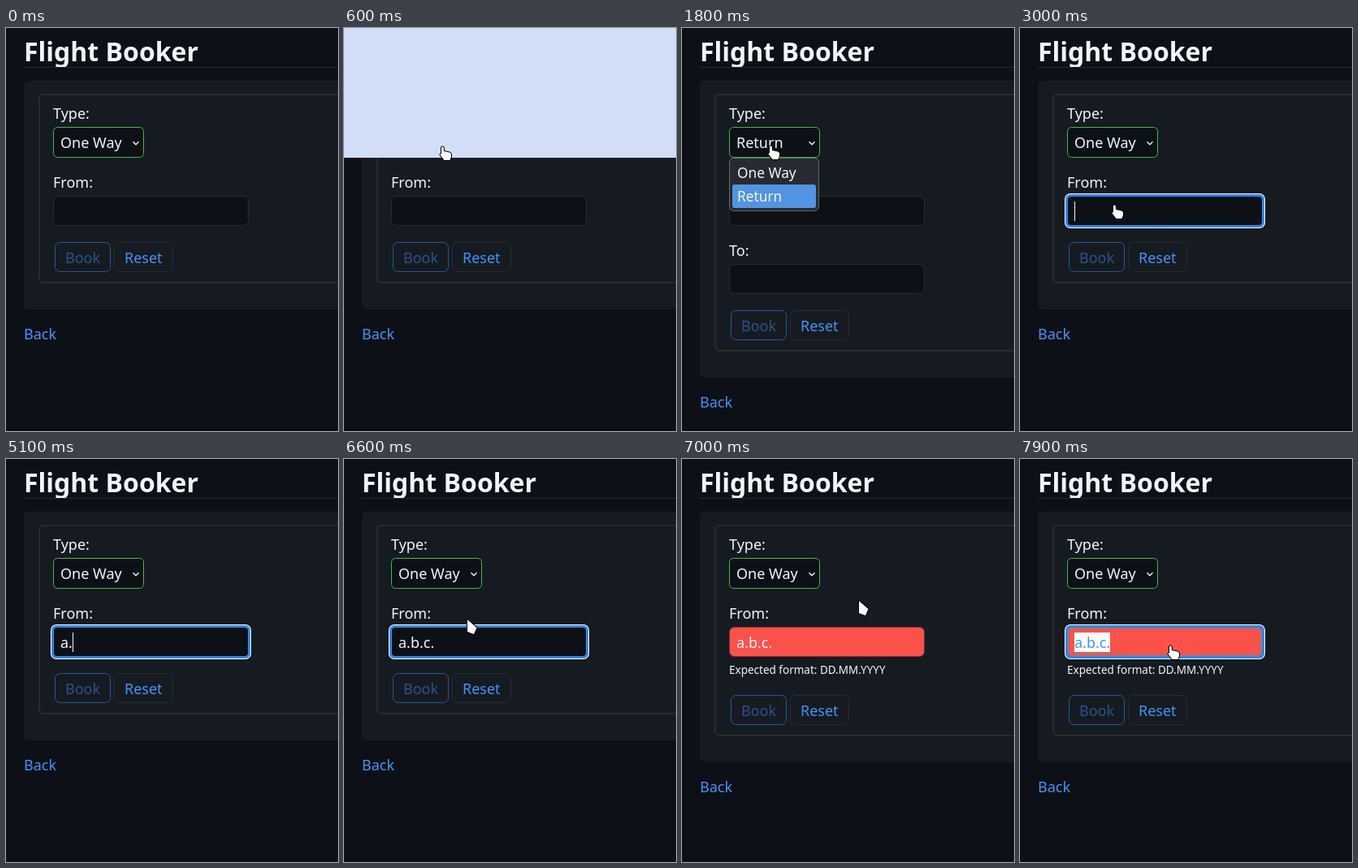
An HTML page with a canvas that plays this animation: 409x497 px, repeating every 8 s.

```html
<!DOCTYPE html>
<html lang="en">
<head>
<meta charset="utf-8">
<title>Flight Booker</title>
<style>
  html, body { margin: 0; width: 100%; height: 100%; overflow: hidden; background: #0d1117; }
  canvas { display: block; }
</style>
</head>
<body>
<canvas id="stage" width="409" height="497"></canvas>
<script>
const ctx = document.getElementById('stage').getContext('2d');
const LOOP = 8000, TICK = 100;
const FONT = '"Noto Sans", sans-serif';
const C = {
  page: '#0d1117', panel: '#161b22', line: '#262b32', text: '#f0f6fc', link: '#4493f8',
  green: '#3fb950', dim: '#2b5289', dimLine: '#28569b', red: '#fa524b', blue: '#3584e4',
  popup: '#282a31', popupLine: '#66686d', hover: '#5294e2', sheet: '#d2ddf8'
};

// time, x, y of the pointer's top left corner
const pointerPath = [
  [200, 230, -12], [500, 117, 146], [700, 118, 146], [1000, 112, 202], [1200, 112, 202],
  [1500, 107, 136], [1700, 106, 145], [1800, 106, 145], [2000, 108, 176], [2200, 108, 176],
  [2700, 112, 220], [2800, 112, 220], [3000, 113, 218], [6500, 113, 218],
  [6800, 229, 157], [6900, 229, 157], [7300, 183, 227], [7500, 182, 230], [8000, 182, 230]
];
const typing = [[3800, 'a'], [5100, 'a.'], [5300, 'a.b'], [5600, 'a.b.'], [5700, 'a.b.c'], [5900, 'a.b.c.']];

const handShape = new Path2D('M2 9V2Q2 .6 3.4 .6T4.9 2V6L12 7.6Q14 8.2 14 10V13L12.4 17H5.6L.8 11Q0 9 2 9Z');
const arrowShape = new Path2D('M0 0V15L8 18L11.5 10Z');
const chevron = new Path2D('M156.5 140.3L160 143.8L163.5 140.3');

const within = (t, a, b) => t >= a && t < b;

function box(x, y, w, h, r, fill, stroke, weight = 1) {
  const inset = stroke ? weight / 2 : 0;
  ctx.beginPath();
  ctx.roundRect(x + inset, y + inset, w - 2 * inset, h - 2 * inset, r);
  if (fill) { ctx.fillStyle = fill; ctx.fill(); }
  if (stroke) { ctx.strokeStyle = stroke; ctx.lineWidth = weight; ctx.stroke(); }
}

function label(str, x, y, color = C.text, size = 18, weight = 400) {
  ctx.font = `${weight} ${size}px ${FONT}`;
  ctx.fillStyle = color;
  ctx.fillText(str, x, y);
}

function pointerAt(t) {
  const i = pointerPath.findIndex(k => k[0] > t);
  const [t0, x0, y0] = pointerPath[i - 1], [t1, x1, y1] = pointerPath[i];
  const p = (t - t0) / (t1 - t0);
  return [Math.round(x0 + (x1 - x0) * p), Math.round(y0 + (y1 - y0) * p)];
}

function drawPointer(t, popup) {
  if (t < 200 || within(t, 3800, 6500)) return;
  const [x, y] = pointerAt(t);
  const onSelect = within(x, 58, 170) && within(y, 122, 160);
  const onInput = !popup && within(x, 58, 299) && within(y, 207, 244);
  const shape = onSelect || onInput ? handShape : arrowShape;
  ctx.save();
  ctx.translate(x, y);
  ctx.lineJoin = 'round';
  ctx.strokeStyle = '#000';
  ctx.lineWidth = 2;
  ctx.stroke(shape);
  ctx.fillStyle = '#fff';
  ctx.fill(shape);
  ctx.restore();
}

function drawInput(y, { focus, error, value = '', caret, selected } = {}) {
  const fill = error ? C.red : C.page;
  if (focus) {
    box(55, y - 3, 247, 43, 7, '#fff');
    box(56, y - 2, 245, 41, 6, C.blue);
    box(59, y + 1, 239, 35, 4, fill, error ? '#4a9a9c' : null);
  } else {
    box(58, y, 241, 37, 6, fill, error ? '#7d3435' : C.line);
  }
  ctx.font = `400 18px ${FONT}`;
  const w = ctx.measureText(value).width;
  if (selected) { ctx.fillStyle = '#fff'; ctx.fillRect(67, y + 7, Math.round(w), 24); }
  label(value, 67, y + 26, selected ? C.link : C.text);
  if (caret) { ctx.fillStyle = C.text; ctx.fillRect(Math.round(67 + w), y + 7, 1, 24); }
}

function drawPopup(active) {
  box(58, 160, 111, 66, 5, C.popup, C.popupLine);
  box(62, 193 - (active ? 0 : 29), 103, 29, 3, C.hover);
  label('One Way', 68, 185, C.text, 17.3);
  label('Return', 68, 214, C.text, 17.3);
}

function draw(t) {
  const isReturn = within(t, 1200, 2200);
  const popup = within(t, 700, 1200) || within(t, 1800, 2200);
  const error = t >= 6700;
  const focus = within(t, 2700, 6700) || t >= 7300;
  const selected = t >= 7900;
  const caret = focus && !within(t, 6300, 6700) && !selected;
  const value = typing.reduce((v, [at, str]) => t >= at ? str : v, '');
  const shift = isReturn ? 84 : error ? 27 : 0;

  ctx.fillStyle = C.page;
  ctx.fillRect(0, 0, 409, 497);
  label('Flight Booker', 22, 41, C.text, 32, 700);
  ctx.fillStyle = C.line;
  ctx.fillRect(22, 48, 387, 1);

  box(22, 65, 420, 282 + shift, 6, C.panel);
  box(40, 81, 420, 234 + shift, 5, null, C.line, 2);
  label('Type:', 58, 112);
  box(58, 122, 112, 38, 5, C.page, C.green);
  label(isReturn ? 'Return' : 'One Way', 67, 148);
  ctx.strokeStyle = C.text;
  ctx.lineWidth = 1.4;
  ctx.stroke(chevron);

  label('From:', 58, 197);
  drawInput(207, { focus, error, value, caret, selected });
  if (isReturn) {
    label('To:', 58, 281);
    drawInput(291);
  }
  if (error) label('Expected format: DD.MM.YYYY', 58, 265, C.text, 13.5);

  box(60, 264 + shift, 69, 37, 6, null, C.dimLine);
  label('Book', 73, 290 + shift, C.dim);
  box(133, 264 + shift, 73, 37, 6, null, C.line);
  label('Reset', 146, 290 + shift, C.link);
  label('Back', 22, 384 + shift, C.link);

  if (popup) drawPopup(within(t, 900, 1900));
  if (within(t, 3900, 5100)) box(58, 247, 241, 87, 5, C.popup, C.popupLine);
  if (within(t, 600, 700)) {
    ctx.fillStyle = C.sheet;
    ctx.fillRect(0, 0, 409, 160);
  }
  drawPointer(t, popup);
}

const start = performance.now();
function loop() {
  const t = (performance.now() - start) % LOOP;
  draw(Math.floor(t / TICK) * TICK);
  requestAnimationFrame(loop);
}
loop();
</script>
</body>
</html>
```
